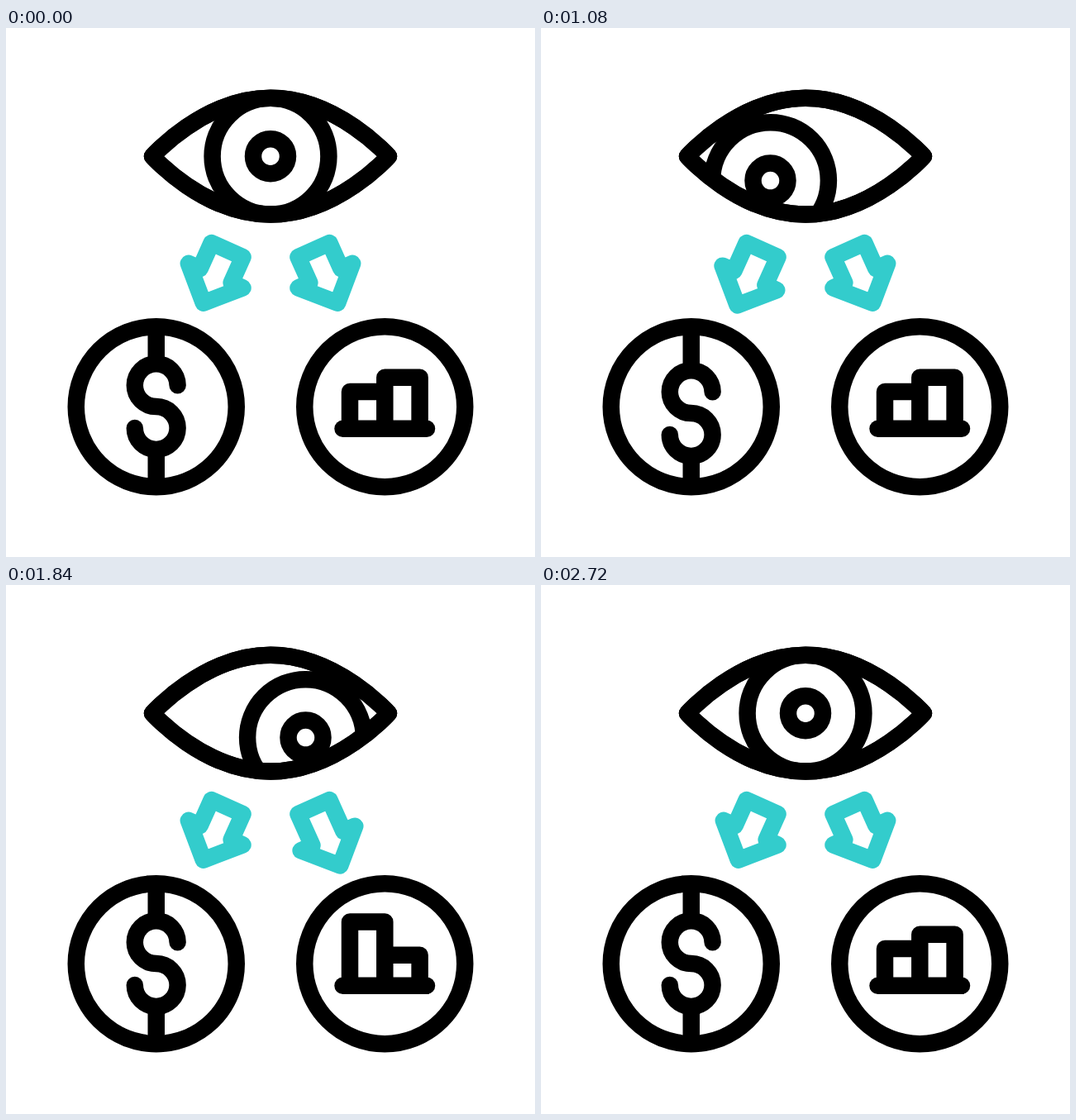
An HTML page for the animation above (3000 ms loop, 640x640 px).

```html
<!DOCTYPE html>
<html lang="en">
<head>
<meta charset="utf-8">
<title>Watching money and charts</title>
<style>
  html, body { margin: 0; width: 100%; height: 100%; overflow: hidden; background: #fff; }
  svg { display: block; width: 100%; height: 100%; }
  .ink { fill: none; stroke: #000; stroke-width: 20.5; stroke-linejoin: round; }
  .round { stroke-linecap: round; }
  .teal { stroke: #33cccc; }
</style>
</head>
<body>
<svg viewBox="0 0 640 640">
  <defs><clipPath id="lens"><path id="lensPath"/></clipPath></defs>
  <g class="ink">
    <g clip-path="url(#lens)">
      <g id="iris">
        <circle cx="320" cy="155.2" r="70.4"/>
        <circle cx="320" cy="155.2" r="21"/>
      </g>
    </g>
    <path id="lid"/>
    <path id="outline"/>

    <path id="arrowL" class="teal" transform="translate(640 0) scale(-1 1)"/>
    <path id="arrowR" class="teal"/>

    <circle cx="181.75" cy="458.2" r="97"/>
    <path id="stems"/>
    <path id="dollar" class="round" d="M207.6 432.2A25.9 25.9 0 1 0 181.75 458.1A25.9 25.9 0 1 1 155.8 484"/>

    <circle cx="458.25" cy="458.2" r="97"/>
    <path class="round" d="M407.5 484.8H509"/>
    <path id="bars"/>
  </g>
</svg>
<script>
const LOOP = 3000, STEP = 40, OPEN = 70.4;
const el = id => document.getElementById(id);
const draw = (id, d) => el(id).setAttribute('d', d);

// Rows of [time, value], linear in between.
const lidKeys = [[100, OPEN], [400, 2.5], [800, OPEN]];
const lookX = [[800, 0], [1000, -42.5], [1433, -42.5], [1633, 42.5], [2167, 42.5], [2700, 0]];
const lookY = [[800, 0], [1000, 29.4], [2167, 29.4], [2700, 0]];
const leftPulse = [[1000, 0], [1200, 1], [1433, 0]];
const rightPulse = [[1633, 0], [1833, 1], [2167, 0]];

function at(keys, t) {
  if (t <= keys[0][0]) return keys[0][1];
  for (let i = 1; i < keys.length; i++) {
    const [t0, v0] = keys[i - 1], [t1, v1] = keys[i];
    if (t < t1) return v0 + (v1 - v0) * (t - t0) / (t1 - t0);
  }
  return keys[keys.length - 1][1];
}

function lens(h) {
  const y = 155.2, top = y - h, low = y + h;
  return `M177 ${y}C177 ${y} 239.6 ${top} 320 ${top}S463 ${y} 463 ${y}` +
    `S400.4 ${low} 320 ${low}S177 ${y} 177 ${y}Z`;
}

// Points are given along and across the arrow's axis, from the tail's middle.
function arrow(stretch) {
  const ux = 0.41, uy = 0.912, head = 34 + stretch;
  const pts = [[0, -20.8], [0, 20.8], [head, 20.8], [head, 36], [head + 36.2, 0], [head, -36], [head, -20.8]];
  return 'M' + pts.map(([a, b]) =>
    `${372.4 + a * ux + b * uy} ${268.6 + a * uy - b * ux}`).join('L') + 'Z';
}

function render(t) {
  const h = at(lidKeys, t), left = at(leftPulse, t), right = at(rightPulse, t);
  draw('lensPath', lens(h));
  draw('lid', lens(h));
  el('iris').setAttribute('transform', `translate(${at(lookX, t)} ${at(lookY, t)})`);

  draw('arrowL', arrow(7.7 * left));
  draw('arrowR', arrow(7.7 * right));

  const drop = 20 * left;
  el('dollar').setAttribute('transform', `translate(0 ${drop})`);
  draw('stems', `M181.75 361V${406.3 + drop}M181.75 ${509.9 + drop}V555`);

  draw('bars', `M416 484.8V${439.9 - 33 * right}H458.3V484.8` +
    `M458.3 484.8V${422.7 + 25.6 * right}H500.6V484.8`);
}

draw('outline', lens(OPEN));
const start = performance.now();
function tick() {
  const t = (performance.now() - start) % LOOP;
  render(Math.floor(t / STEP) * STEP);
  requestAnimationFrame(tick);
}
tick();
</script>
</body>
</html>
```
